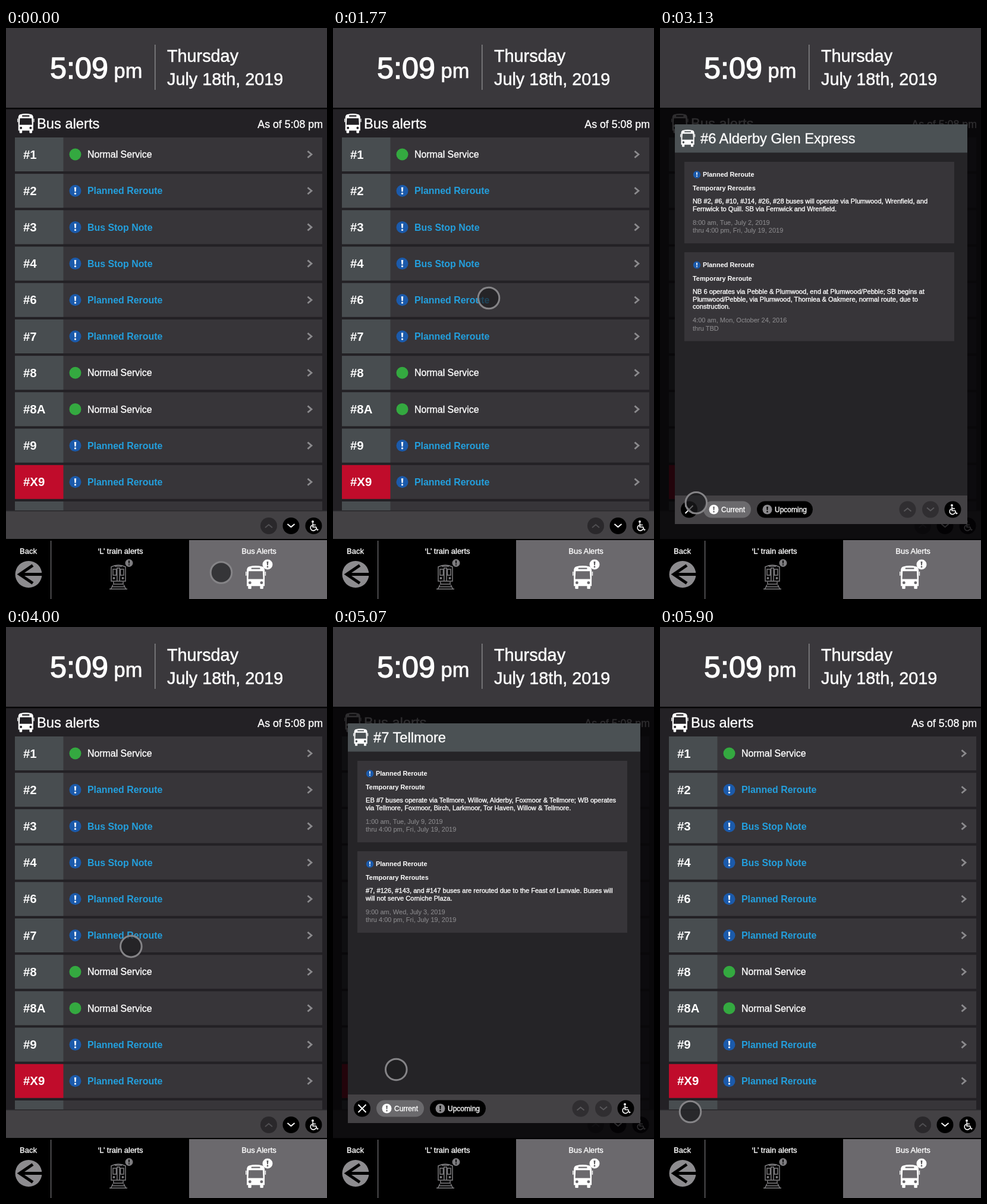
An HTML page for the animation above (5930 ms loop, 540 by 960 pixels).

```html
<!DOCTYPE html>
<html lang="en">
<head>
<meta charset="utf-8">
<title>Transit kiosk</title>
<style>
html, body { margin: 0; width: 100%; height: 100%; overflow: hidden; background: #000; }
svg { display: block; width: 100vw; height: 100vh; }
text { font-family: "Liberation Sans", Arial, sans-serif; white-space: pre; }
</style>
</head>
<body>
<svg id="stage" viewBox="0 0 540 960"></svg>
<script>
const LOOP = 5930;
const ROW = '#373539', BAR = '#434144', GRAY = '#8b8a8d', BLUE = '#1b5aab', DIM = '#7d7c7f';

const rect = (x, y, w, h, fill, rx = 0) =>
  `<rect x="${x}" y="${y}" width="${w}" height="${h}" rx="${rx}" fill="${fill}"/>`;
const disc = (x, y, r, fill) => `<circle cx="${x}" cy="${y}" r="${r}" fill="${fill}"/>`;
const line = (d, color, width) =>
  `<path d="${d}" fill="none" stroke="${color}" stroke-width="${width}"/>`;
const at = (x, y, body, scale = 1) => `<g transform="translate(${x} ${y}) scale(${scale})">${body}</g>`;
const text = (x, y, size, str, { fill = '#fff', bold = false, anchor = 'start', stroke = 0.35 } = {}) =>
  `<text x="${x}" y="${y}" font-size="${size}" fill="${fill}" text-anchor="${anchor}" ` +
  (bold ? 'font-weight="700"' : `stroke="${fill}" stroke-width="${stroke}"`) +
  `>${str.replace(/&/g, '&amp;')}</text>`;

// Icons
const bang = (x, y, r, fill, mark) => disc(x, y, r, fill) +
  at(x, y, `<path d="M-1.7 -6h3.4l-.7 7.6h-2z" fill="${mark}"/>` + disc(0, 4.6, 1.6, mark), r / 10);
const chevron = (x, y, color, up) =>
  line(`M${x - 6} ${y + (up ? 3 : -3)}l6 ${up ? -5 : 5}l6 ${up ? 5 : -5}`, color, 2);
const bus = (x, y, scale) => at(x, y, `<path fill="#fff" fill-rule="evenodd" d="
  M5 1.2Q14 -1 23 1.2Q26 2 26.3 6V28H24.5V31Q24.5 32 23.5 32H21Q20 32 20 31V28H8V31Q8 32 7 32H4.5
  Q3.5 32 3.5 31V28H1.7V6Q2 2 5 1.2Z M8 2.8h12v2h-12z M4.3 7.5h19.4l.6 11h-20.6z
  M4 23.5a2 2 0 1 0 4 0a2 2 0 1 0 -4 0 M20 23.5a2 2 0 1 0 4 0a2 2 0 1 0 -4 0"/>` +
  rect(0, 8, 1.2, 6, '#fff', 0.6) + rect(26.8, 8, 1.2, 6, '#fff', 0.6), scale);
const wheelchair = (x, y) => at(x, y,
  disc(-1.5, -7, 1.9, '#fff') +
  line('M-1.3 -4.5V2H4L6 7L8 6.3M-1.3 -1.5H3.5', '#fff', 1.7) +
  line('M-2.6 -1A4.8 4.8 0 1 0 4 5', '#fff', 1.6));
const train = at(174, 901,
  line('M3 29V5Q15 -1 27 5V29Z M6 9H11.5V19H6Z M18.5 9H24V19H18.5Z M12.8 29V7H17.2V29 M9 4H21', DIM, 1.5) +
  line('M7 30V34H23V30 M6 35L2 43M24 35L28 43M4 38.5H26M0 42.3H30', DIM, 1.5) +
  disc(7.5, 24, 2, DIM) + disc(22.5, 24, 2, DIM));

// Main screen
const header = rect(0, 0, 540, 134, '#3a383c') + rect(0, 134, 540, 2.5, '#060607') +
  rect(250, 28, 1.5, 76, '#858487') +
  text(74, 84.7, 50.3, '5:09', { stroke: 1.4 }) + text(181.5, 84, 34.4, 'pm', { stroke: 0.7 }) +
  text(271, 57, 28.8, 'Thursday', { stroke: 0.5 }) + text(271, 95.5, 28.8, 'July 18th, 2019', { stroke: 0.5 });

function row([id, kind], i) {
  const y = 184 + i * 61.2, mid = y + 28.5;
  const ok = kind === 'Normal Service';
  return rect(15, y, 517, 57, ROW) + rect(15, y, 81.5, 57, id === 'X9' ? '#c00c2b' : '#484d50') +
    text(29, mid + 7, 20.4, '#' + id, { bold: true }) +
    (ok ? disc(116.5, mid, 10, '#34a940') : bang(116.5, mid, 10, BLUE, '#fff')) +
    text(137, mid + 5.7, 15.9, kind, ok ? {} : { bold: true, fill: '#239fdd' }) +
    line(`M507.5 ${mid - 5.5}l6.5 5.5l-6.5 5.5`, GRAY, 2.8);
}
const N = 'Normal Service', P = 'Planned Reroute', S = 'Bus Stop Note';
const routes = [['1', N], ['2', P], ['3', S], ['4', S], ['6', P], ['7', P],
  ['8', N], ['8A', N], ['9', P], ['X9', P], ['10', P]];

const list = rect(0, 136, 540, 724, '#232125') + bus(19, 144, 1.02) +
  text(52, 169, 23.7, 'Bus alerts') + text(533, 168, 17.8, 'As of 5:08 pm', { anchor: 'end' }) +
  routes.map(row).join('') +
  rect(0, 811, 540, 49, BAR) + rect(0, 811, 540, 1.5, '#29282b') +
  disc(442, 837, 14, '#2a282b') + chevron(442, 837, '#504f52', true) +
  disc(479.5, 837, 14, '#000') + chevron(479.5, 837, '#fff') +
  disc(517.5, 837, 14, '#000') + wheelchair(517.5, 837);

const label = (x, str) => text(x, 884, 13, str, { anchor: 'middle' });
const tabs = rect(0, 859, 540, 101, '#000') + rect(75, 862, 1.2, 98, '#77767a') +
  rect(308, 861, 232, 99, '#6b696d') +
  label(37.5, 'Back') + label(192.5, '‘L’ train alerts') + label(425.5, 'Bus Alerts') +
  disc(38, 918.5, 22.5, '#8d8c8f') + line('M61 918.5H24M45 903.5L23 918.5L45 933.5', '#000', 5) +
  train + bang(207, 899.5, 6.5, DIM, '#000') +
  bus(403, 904, 1.22) + bang(440, 902, 8.5, '#fff', '#5a595c');

// Alert window
function card(y, { title, lines, dates }) {
  const h = 137 + (lines.length - 2) * 12.5;
  const dateY = y + 80.5 + lines.length * 12.6;
  return rect(41, y, 454, h, ROW) +
    text(72, y + 25, 10.9, P, { bold: true }) + text(55, y + 47.5, 10.9, title, { bold: true }) +
    lines.map((s, i) => text(55, y + 70.3 + i * 12.5, 11.1, s)).join('') +
    dates.map((s, i) => text(55, dateY + i * 13.3, 11, s, { fill: GRAY, stroke: 0.1 })).join('');
}

function footer(loaded) {
  const shift = loaded ? 15 : 0;
  const pill = (x, w, fill, mark, str) => rect(x, 795.5, w + shift, 28, fill, 14) +
    (loaded ? bang(x + 17.5, 809.5, 8, mark, fill) : '') + text(x + 15 + shift, 813.5, 12, str);
  return disc(49, 809.5, 14, '#000') + pill(73, 65, '#6b6a6d', '#fff', 'Current') +
    pill(148 + shift, 79, '#000', GRAY, 'Upcoming') +
    disc(416.5, 809.5, 14, '#302e31') + disc(455, 809.5, 14, '#302e31') + disc(492.5, 809.5, 14, '#000') +
    (loaded ? line('M42.5 803l13 13m0 -13l-13 13', '#fff', 2) + chevron(416.5, 809.5, '#59585b', true) +
      chevron(455, 809.5, '#59585b') + wheelchair(492.5, 809.5) : '');
}

function modal({ name, cards }, loaded) {
  return rect(0, 136, 540, 724, 'rgba(4,3,5,.83)') +
    rect(25, 162, 492, 672, '#252427') + rect(25, 162, 492, 47.5, '#4b5154') +
    text(loaded ? 68 : 45, 194, 23.7, name) +
    cards.map((c, i) => card(225 + i * 152, c)).join('') +
    rect(25, 786, 492, 48, BAR) + footer(loaded) +
    (loaded ? bus(34, 171, 0.9) + bang(62, 246.5, 6.2, BLUE, '#fff') + bang(62, 398.5, 6.2, BLUE, '#fff') : '');
}

const alerts = [{
  name: '#6 Alderby Glen Express', open: 2080, ready: 2320, close: 3650,
  cards: [{
    title: 'Temporary Reroutes',
    lines: ['NB #2, #6, #10, #J14, #26, #28 buses will operate via Plumwood, Wrenfield, and',
      'Fernwick to Quill. SB via Fernwick and Wrenfield.'],
    dates: ['8:00 am, Tue, July 2, 2019', 'thru 4:00 pm, Fri, July 19, 2019']
  }, {
    title: 'Temporary Reroute',
    lines: ['NB 6 operates via Pebble & Plumwood, end at Plumwood/Pebble; SB begins at',
      'Plumwood/Pebble, via Plumwood, Thornlea & Oakmere, normal route, due to', 'construction.'],
    dates: ['4:00 am, Mon, October 24, 2016', 'thru TBD']
  }]
}, {
  name: '#7 Tellmore', open: 4500, ready: 4740, close: 5600,
  cards: [{
    title: 'Temporary Reroute',
    lines: ['EB #7 buses operate via Tellmore, Willow, Alderby, Foxmoor & Tellmore; WB operates',
      'via Tellmore, Foxmoor, Birch, Larkmoor, Tor Haven, Willow & Tellmore.'],
    dates: ['1:00 am, Tue, July 9, 2019', 'thru 4:00 pm, Fri, July 19, 2019']
  }, {
    title: 'Temporary Reroutes',
    lines: ['#7, #126, #143, and #147 buses are rerouted due to the Feast of Lanvale. Buses will',
      'will not serve Corniche Plaza.'],
    dates: ['9:00 am, Wed, July 3, 2019', 'thru 4:00 pm, Fri, July 19, 2019']
  }]
}];

const stage = document.getElementById('stage');
stage.innerHTML = list + header + tabs +
  alerts.map(a => `<g class="modal">${modal(a, false)}</g><g class="modal">${modal(a, true)}</g>`).join('') +
  '<circle id="pointer" r="17.8" fill="#1d1c1f" fill-opacity=".68" stroke="#858487" stroke-width="3"/>';
const layers = [...stage.querySelectorAll('.modal')];
const pointer = document.getElementById('pointer');

// Pointer moves: start, end, destination
const home = [362, 915.5];
const moves = [[250, 1192, 262, 454], [2500, 3210, 52, 809], [3640, 4061, 222, 523], [4750, 5228, 51, 815]];

// x trails y a little, so each move is a slight arc
function pointerAt(t) {
  let [x, y] = home;
  for (const [start, end, tx, ty] of moves) {
    const u = Math.min(1, Math.max(0, (t - start) / (end - start)));
    const e = (1 - Math.cos(Math.PI * u)) / 2;
    x += (tx - x) * e ** 1.4;
    y += (ty - y) * e;
  }
  return [x, y];
}

const show = (el, on) => { el.style.display = on ? '' : 'none'; };

function draw(now) {
  const t = now % LOOP;
  alerts.forEach((a, i) => {
    show(layers[2 * i], t >= a.open && t < a.ready);
    show(layers[2 * i + 1], t >= a.ready && t < a.close);
  });
  const [x, y] = pointerAt(t);
  pointer.setAttribute('cx', x);
  pointer.setAttribute('cy', y);
}

const began = performance.now();
function tick() {
  draw(performance.now() - began);
  requestAnimationFrame(tick);
}
tick();
</script>
</body>
</html>
```
